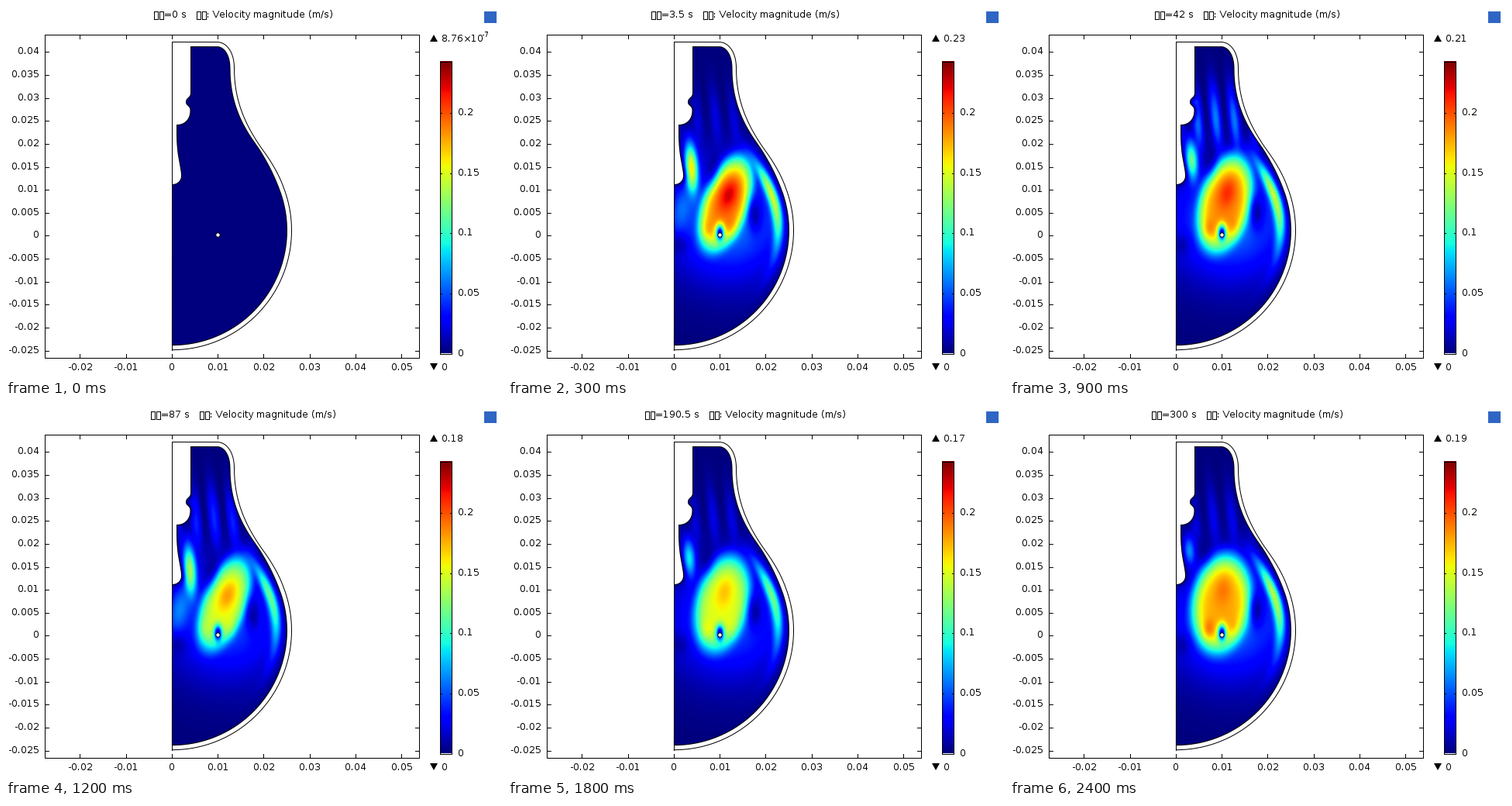
Recreate the animation shown at these times as a matplotlib script. Size 640 by 480 pixels, loop 2.5 s.

```python
import numpy as np
import matplotlib.pyplot as plt
from matplotlib.animation import FuncAnimation
from matplotlib.patches import Circle, Polygon, Rectangle
from matplotlib.path import Path

W, H, FRAMES, STEP = 640, 480, 25, 100
X0, Y0, SCALE = 214.4, 295.4, 5925      # origin in pixels, pixels per metre
TOP = 0.2424                            # speed at the end of the colour bar
PX = 0.72                               # one pixel in points

# Flow history: simulated time, peak speed, sideways sway, activity in the neck
KEYS = [0, 2, 6, 12, 16, 20, 24]
TIME = [0, 1.5, 13.5, 87, 156, 228, 300]
PEAK = [0, 0.22, 0.24, 0.18, 0.16, 0.18, 0.19]
SWAY = [1.2, 1.2, 0, 1, 0.75, 0.05, 0]
NECK = [0, 0.05, 1, 0.7, 0.4, 0.35, 0.35]

plt.rcParams.update({
    "font.family": "DejaVu Sans",
    "text.hinting": "native",
    "text.hinting_factor": 1,
})

fig = plt.figure(figsize=(W / 100, H / 100), dpi=100, facecolor="white")
ax = fig.add_axes([0, 0, 1, 1])
ax.axis("off")


# ---- drawing helpers ----
def bez(*pts, n=40):
    t = np.linspace(0, 1, n)[:, None]
    p = [np.array(q, float) + 0 * t for q in pts]
    while len(p) > 1:
        p = [a + (b - a) * t for a, b in zip(p, p[1:])]
    return p[0]


def arc(r, n=160):
    a = np.radians(np.linspace(-21.6, 90, n))
    return np.c_[X0 + r * np.cos(a), 289.6 + r * np.sin(a)]


def line(xs, ys):
    """Straight strokes through whole pixels; the offsets make them snap."""
    ax.plot(np.add(xs, 0.3), np.add(ys, 0.7), color="black", lw=PX, zorder=4)


def box(x0, y0, x1, y1):
    line([x0, x1, x1, x0, x0], [y0, y0, y1, y1, y0])


def curve(pts):
    ax.plot(*pts.T, color="black", lw=PX, zorder=4)


def label(x, y, s, ha="left", size=12):
    return ax.text(x, y, s, ha=ha, va="baseline", fontsize=size * PX)


# ---- lamp geometry ----
ball, glass = arc(148.1), arc(154.1)
bulb = np.vstack([
    bez((238.5, 52.5), (272, 52.5)),
    bez((272, 52.5), (282, 52.5), (289, 64), (289, 80)),
    bez((289, 80), (289, 118), (300, 148), (322, 178)),
    bez((322, 178), (334, 195), (345, 216), ball[0]),
    ball,
])
shell = np.vstack([
    bez((214.5, 46.5), (272, 46.5)),
    bez((272, 46.5), (285, 46.5), (294.5, 60), (294.5, 80)),
    bez((294.5, 80), (294.5, 120), (307, 151), (330, 184)),
    bez((330, 184), (342, 200), (352, 217), glass[0]),
    glass,
])
stem = np.vstack([
    bez((214.5, 230.5), (221, 230.5), (226.5, 226), (226.5, 219)),
    bez((226.5, 219), (226.5, 208), (220.5, 195), (220.5, 165)),
    bez((220.5, 165), (220.5, 153.5)),
    bez((220.5, 153.5), (231, 153.5), (238, 146), (238, 135)),
    bez((238, 135), (238, 128), (232.5, 129), (232.5, 124)),
    bez((232.5, 124), (232.5, 118), (238.5, 119), (238.5, 112)),
    bez((238.5, 112), (238.5, 52.5)),
])
gas = np.vstack([bulb, stem])
HOLE = (273.5, 295.5)

# ---- speed field ----
LEFT, RIGHT, UP, DOWN = 214, 366, 50, 441
gx, gy = np.meshgrid(np.arange(LEFT, RIGHT) + 0.5, np.arange(UP, DOWN) + 0.5)
inside = Path(gas).contains_points(np.c_[gx.ravel(), gy.ravel()])
inside = inside.reshape(gx.shape) & (np.hypot(gx - HOLE[0], gy - HOLE[1]) > 2.5)


def distance(pts):
    d = np.full(gx.shape, 1e9)
    for x, y in pts[::2]:
        np.minimum(d, (gx - x) ** 2 + (gy - y) ** 2, out=d)
    return np.sqrt(d)


to_glass = distance(bulb)
no_slip = 1 - np.exp(-np.minimum(to_glass, distance(stem)) / 3.5)
# return flow that hugs the glass, fading faster upwards
reach = np.where(gy < 243, 45, 75)
downflow = 0.7 * np.exp(-((to_glass - 14) / 8) ** 2 - ((gy - 243) / reach) ** 2)


def blob(x, y, a, b, tilt=0, sharp=1):
    c, s = np.cos(np.radians(tilt)), np.sin(np.radians(tilt))
    dx, dy = gx - x, gy - y
    q = ((dx * c + dy * s) / a) ** 2 + ((dx * s - dy * c) / b) ** 2
    return np.exp(-0.75 * q ** sharp)


def shape(s, neck):
    """Relative speed: streams add in quadrature, eddies cut holes in them."""
    ripple = np.cos(np.pi * (gx - 262 - 6 * s - 0.1 * (gy - 140)) / 24) ** 2
    streams = [
        0.85 * blob(273 + 9 * s, 255, 37 - 9 * s, 62, 8 + 12 * s, 2.5),
        (0.4 + 0.25 * s) * blob(275 + 11 * s, 236 + 8 * s, 14, 26, 8 + 12 * s),
        (0.5 - 0.15 * s) * blob(256, 289, 9, 16),
        0.3 * blob(290, 286, 8, 16),
        0.3 * blob(285, 275, 65, 65),
        (0.35 + 0.5 * s) * blob(231 + 6 * s, 187 + 25 * s, 8, 18 + 12 * s, -4),
        0.35 * s ** 4 * blob(224, 262, 14, 34, 12),
        0.35 * neck * ripple * np.exp(-((gy - 145) / 45) ** 2),
        downflow,
    ]
    eddies = [
        0.95 * blob(273.5, 293, 4.5, 9),
        0.8 * blob(319, 263 + 7 * s, 8, 20),
        0.65 * blob(250 + 15 * s, 184 + 26 * s, 8, 14 + 8 * s, 14 * s),
        0.6 * blob(221, 308, 10, 12),
    ]
    v = np.sqrt(sum(f * f for f in streams)) * no_slip
    for e in eddies:
        v = v * (1 - e)
    return v / v[inside].max()


def at(n, values):
    return np.interp(n, KEYS, values)


def speed(n):
    v = at(n, PEAK) * shape(at(n, SWAY), at(n, NECK))
    return np.ma.array(v, mask=~inside)


def clock(n):
    grid = 0.5 if n < 6 else 1.5
    return round(at(n, np.sqrt(TIME)) ** 2 / grid) * grid


# ---- static parts ----
field = ax.imshow(speed(0), cmap="jet", vmin=0, vmax=TOP, aspect="auto",
                  interpolation="nearest", extent=(LEFT, RIGHT, DOWN, UP))
curve(np.vstack([gas, gas[:1]]))
curve(shell)
line([214, 214], [46, 443])
ax.add_patch(Circle(HOLE, 2.7, fc="white", ec="black", lw=PX, zorder=5))

box(50, 36, 533, 453)
for k in range(-2, 6):
    x = X0 + k * SCALE / 100
    for y0, y1 in ((448, 453), (36, 41)):
        line([int(x)] * 2, [y0, y1])
    label(x, 470, f"{k / 100:g}", "center")
for k in range(-5, 9):
    y = round(Y0 - k * SCALE / 200)
    for x0, x1 in ((50, 55), (528, 533)):
        line([x0, x1], [y, y])
    label(43, y + 4, f"{k / 200:g}", "right")

ax.imshow(np.linspace(1, 0, 377)[:, None], cmap="jet", vmin=0, vmax=1,
          aspect="auto", extent=(560, 576, 448, 71))
box(560, 71, 575, 448)
for k in range(5):
    y = round(448 - 377 * k * 0.05 / TOP)
    line([560, 562], [y, y])
    line([573, 575], [y, y])
    label(583, y + 4, f"{k * 0.05:g}")
for tip, base in ((37, 46), (470, 461)):
    ax.add_patch(Polygon([(547, base), (557, base), (552, tip)], color="black", lw=0))
label(562, 470, "0")
ax.add_patch(Rectangle((617, 7), 16, 15, color="#2f66c4", lw=0))

# ---- moving text ----
peak = label(562, 46, "")
power = label(614, 40, "", size=9)
title = label(305.5, 15, "", "center")
TOFU = "\u65f6" * 2     # not in the font, so it shows as empty boxes

ax.set_xlim(0, W)
ax.set_ylim(H, 0)


def draw(n):
    field.set_data(speed(n))
    title.set_text(f"{TOFU}={clock(n):g} s   {TOFU}: Velocity magnitude (m/s)")
    peak.set_text(f"{at(n, PEAK):.2f}" if n else "8.76×10")
    power.set_text("" if n else "-7")
    return [field, title, peak, power]


anim = FuncAnimation(fig, draw, frames=FRAMES, interval=STEP, repeat=True,
                     repeat_delay=0, blit=False)
plt.show()
```
